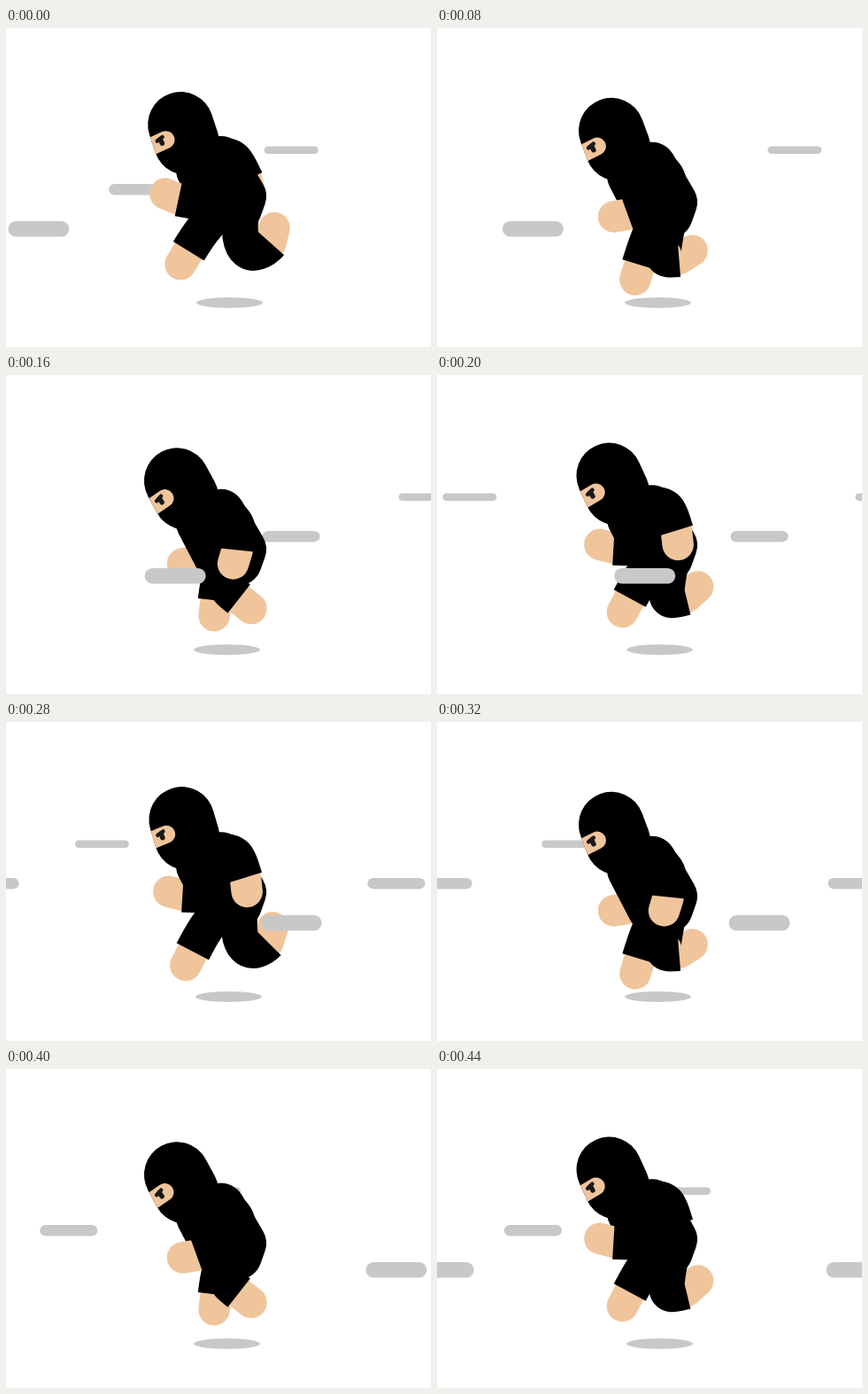
Recreate the animation shown at these times as an HTML page with a canvas. Size 480 by 360 pixels, loop 480 ms.

```html
<!DOCTYPE html>
<html lang="en">
<head>
<meta charset="utf-8">
<title>Running ninja</title>
<style>
  html, body { margin: 0; width: 100%; height: 100%; overflow: hidden; background: #fff; }
  canvas { display: block; }
</style>
</head>
<body>
<canvas id="stage" width="480" height="360"></canvas>
<script>
const ctx = document.getElementById('stage').getContext('2d');
const STEPS = 12, STEP_MS = 40;
const SKIN = '#f0c59c', BLACK = '#000', GREY = '#c8c8c8', EYE = '#1a1818';
const { sin, cos, PI } = Math;
const rad = degrees => degrees * PI / 180;
const wave = (mean, c, s, t) => mean + c * cos(t) + s * sin(t);

function line(x1, y1, x2, y2, width, color) {
  ctx.lineWidth = width;
  ctx.strokeStyle = color;
  ctx.lineCap = 'round';
  ctx.beginPath();
  ctx.moveTo(x1, y1);
  ctx.lineTo(x2, y2);
  ctx.stroke();
}

// A limb is a bare tip, a cuff set back from it, and cloth running to its root.
// `skew` turns the tip against the cuff.
function makeLimb(tipX, tipY, angle, skew, length, root, bend) {
  const tilt = rad(angle + skew);
  return {
    tipX, tipY, root, bend, angle: rad(angle),
    x: tipX - length * cos(tilt), y: tipY - length * sin(tilt)
  };
}

// Pendulum swing between the front and back of the body
function armAt(t, bob) {
  const x = 228 - 51 * cos(t) + 3 * cos(3 * t);
  const y = 196 + 34 * sin(t) ** 4 + bob;
  return makeLimb(x, y, 128 + 64 * cos(t), 11, 16, [241, 151 + bob]);
}

// The foot runs round a loop; the knee folds while the shin points up
function legAt(t, bob) {
  const x = wave(254, -53, -6.5, t) - 4 * cos(2 * t);
  const y = wave(260.4, 20.5, 7.1, t) - 14.3 * cos(2 * t);
  const angle = wave(wave(51.8, 85, 15.3, t), -15, -9.4, 2 * t);
  const folded = angle < 0;
  const root = [259 - 9 * cos(t), 204 + bob];
  return makeLimb(x, y, angle, folded ? -28 : 0, 17.5, root, folded && [254, 261]);
}

const drawTip = limb => line(limb.x, limb.y, limb.tipX, limb.tipY, 35.5, SKIN);

function drawCloth({ x, y, angle, root, bend }, width, reach) {
  const elbow = [x - reach * cos(angle), y - reach * sin(angle)];
  ctx.lineWidth = width;
  ctx.strokeStyle = BLACK;
  ctx.lineCap = 'butt';
  ctx.beginPath();
  ctx.moveTo(...root);
  ctx.bezierCurveTo(...(bend || elbow), ...elbow, x, y);
  ctx.stroke();
}

function drawArm(t, bob) {
  const arm = armAt(t, bob);
  drawTip(arm);
  drawCloth(arm, 39, 30);
}

function drawLegs(t, bob) {
  const legs = [legAt(t, bob), legAt(t + PI, bob)];
  legs.forEach(drawTip);
  legs.forEach(leg => drawCloth(leg, 41, 25));
}

function drawTorso(bob) {
  ctx.fillStyle = ctx.strokeStyle = BLACK;
  ctx.lineWidth = 54;
  ctx.lineJoin = 'round';
  ctx.beginPath();
  for (const [x, y] of [[219, 169], [243, 158], [267, 199], [262, 213], [242, 213]]) {
    ctx.lineTo(x, y + bob);
  }
  ctx.closePath();
  ctx.fill();
  ctx.stroke();
}

function drawHead(t) {
  ctx.save();
  ctx.translate(wave(195.7, 1.5, 2.3, t), wave(114.7, -5.7, -2, t));
  ctx.rotate(-rad(wave(22.5, -4, -4.6, t)));
  line(0, 0, 0, 21, 74, BLACK);
  ctx.beginPath();
  ctx.rect(-37, -10, 60, 50);
  ctx.clip();
  line(-45, 13.5, -21.3, 11, 20, SKIN);
  line(-31, 9.2, -24, 6.8, 4.5, EYE);
  line(-27, 8.5, -26.5, 13.5, 5.5, EYE);
  ctx.restore();
}

function drawShadow(t) {
  ctx.fillStyle = GREY;
  ctx.beginPath();
  ctx.ellipse(wave(250.5, 2, 0, t), 310, 37.5, 6, 0, 0, 2 * PI);
  ctx.fill();
}

// Streaks ease in and out across the stage, one per cycle, visible from step `first` to `last`
function drawStreak(k, offset, first, last, y, width, height) {
  const phase = (k + offset) % STEPS;
  for (const p of [phase - STEPS, phase, phase + STEPS]) {
    if (p < first || p > last) continue;
    const x = 252.3 + 314 * sin(0.14 * (p - 5.4));
    const half = (width - height) / 2;
    line(x - half, y, x + half, y, height, GREY);
  }
}

function draw(now) {
  const k = Math.floor(now / STEP_MS) % STEPS;
  const cycle = 2 * PI * k / STEPS, stride = 2 * cycle;
  const bob = -4.5 - 4.5 * cos(stride);
  ctx.fillStyle = '#fff';
  ctx.fillRect(0, 0, 480, 360);

  const lowestStep = k % 6 === 3;
  if (!lowestStep) drawShadow(stride);
  drawStreak(k, 7, 0, 12, 137.7, 61, 8.5);
  drawStreak(k, 3, -2, 12, 182.2, 65, 12.5);

  drawArm(cycle + PI, bob);
  drawLegs(cycle, bob);
  drawTorso(bob);
  drawArm(cycle, bob);
  drawHead(stride);

  drawStreak(k, 0, -1, 11, 226.8, 69, 17.5);
}

const start = performance.now();
function tick() {
  draw(performance.now() - start);
  requestAnimationFrame(tick);
}
tick();
</script>
</body>
</html>
```
